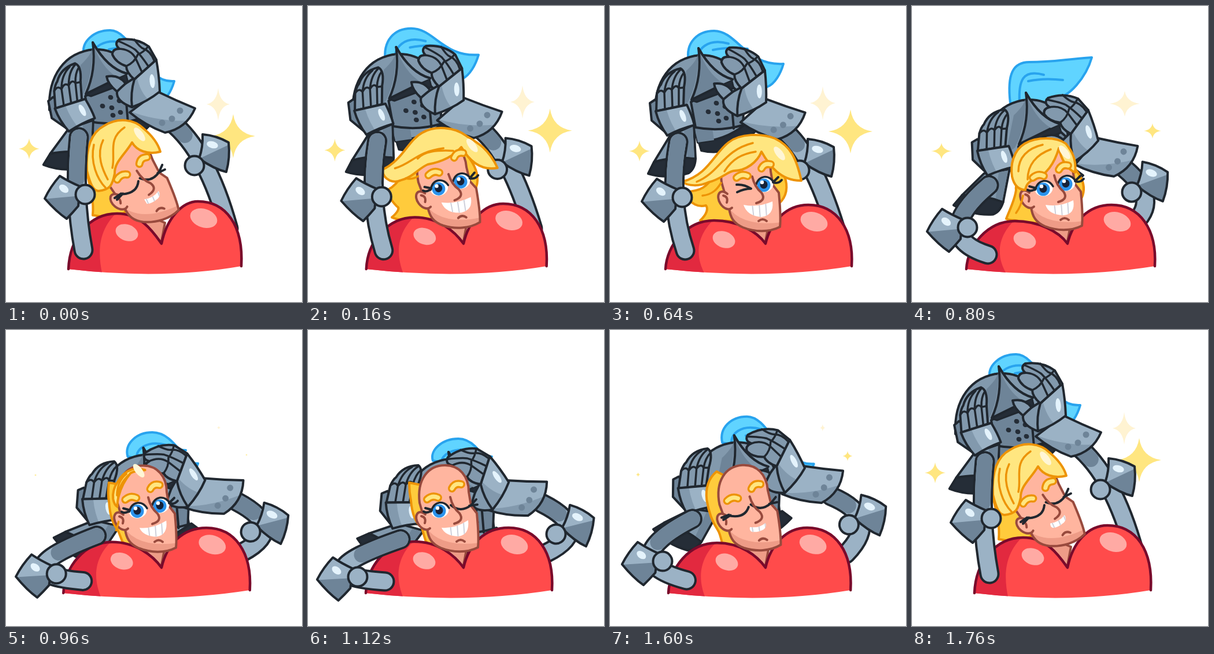
Recreate the animation shown at these times as an HTML page with a canvas. Size 512 px wide and 512 px high, loop 1.84 s.

```html
<!DOCTYPE html>
<html lang="en">
<head>
<meta charset="utf-8">
<title>Knight</title>
<style>
html, body { margin: 0; height: 100%; overflow: hidden; background: #fff; }
canvas { display: block; width: 100vw; height: 100vh; }
</style>
</head>
<body>
<canvas id="stage" width="512" height="512"></canvas>
<script>
const ctx = document.getElementById('stage').getContext('2d');
const STEP = 80, LOOP = 1840;
const INK = '#20272f', LIGHT = '#9bb2c5', STEEL = '#8299ad', MID = '#6e8498', DARK = '#252d37';
const SKIN = '#ffb59f', BLUSH = '#ee9c87', BROWN = '#984a3d';
const GOLD = '#ffe680', AMBER = '#ffcb3c', ORANGE = '#ed9306';

// Position along the list of poses at each step of the loop.
const COURSE = [0, .4, .8, 1.05, 1, 1.2, 1.5, 1.8, 2, 2.4, 3, 3.5,
  3.88, 4.05, 4, 4.15, 4.5, 4.8, 5, 5.08, 5.22, 5.55, 6];

// One entry per pose: thrown back, lifted, winking, lowering, down, resting.
const TRACKS = {
  starBig: ['393 225 38 38', '425 213 38 38', '416 217 38 38', '416 216 15 13', '416 216 0 0', '416 216 0 0'],
  starSmall: ['40 247 18 18', '48 250 18 20', '51 251 18 18', '51 251 18 14', '51 251 0 0', '51 251 0 0'],
  starPale: ['367 170 20 28', '372 165 21 29', '368 168 22 29', '368 169 26 22', '368 169 0 0', '368 169 0 0'],
  plume: ['135 85 180 42 291 130', '134 100 178 38 296 73', '136 95 180 43 300 100',
    '170 168 203 97 311 89', '216 226 260 188 335 250', '211 226 253 180 370 260'],
  helmet: ['-3 -10 0', '0 0 0', '0 0 0', '44 77 0', '90 138 0', '80 143 0'],
  heart: ['108 407 359 338', '99 414 367 343', '96 418 371 344', '94 420 372 344',
    '100 422 366 342', '99 417 371 343', '108 413 359 338'],
  head: ['260 376 -18', '253 390 -1', '250 392 0', '250 390 0', '250 386 0', '250 387 0'],
  handL: ['117 190 -6', '110 198 0', '110 198 0', '143 268 3', '162 320 11', '155 322 10'],
  cuffL: ['130 206 5', '125 216 0', '125 216 0', '147 287 14', '178 342 40', '174 344 40'],
  armL: ['M126 227Q116 325 134 422', 'M118 235Q100 333 130 423', 'M118 235Q100 333 130 423',
    'M133 310Q30 398 131 430', 'M160 362Q-22 425 133 435', 'M147 355Q-28 420 132 436'],
  elbowL: ['137 326 0', '125 331 0', '125 331 0', '96 383 0', '86 427 2', '78 421 2'],
  handR: ['242 135 0', '247 152 4', '247 152 4', '296 225 -12', '320 264 -30', '329 264 -28'],
  cuffR: ['240 165 0', '250 180 -5', '250 180 -5', '303 250 -13', '328 284 -22', '338 284 -22'],
  armR: ['M285 200Q348 250 385 385', 'M300 215Q350 255 390 385', 'M300 215Q350 255 390 385',
    'M360 275Q432 330 385 375', 'M405 300Q495 345 412 386', 'M410 312Q505 345 415 388'],
  elbowR: ['326 276 0', '328 284 0', '328 284 0', '380 322 5', '429 353 11', '438 354 10'],
  mouth: ['M243 344Q258 347 271 338Q273 346 266 350Q254 355 245 353Q241 350 243 344Z',
    'M227 340Q255 346 284 335Q287 361 262 364Q233 362 227 340Z',
    'M231 342Q256 347 281 336Q284 360 262 363Q237 361 231 342Z',
    'M231 344Q256 348 279 336Q283 360 262 362Q236 361 231 344Z',
    'M231 346Q254 348 277 333Q280 358 260 361Q237 360 231 346Z',
    'M243 346Q258 350 270 341Q272 348 266 352Q254 357 245 354Q241 351 243 346Z'],
  brows: ['0 0 0 0', '3 -6 5 -22', '10 -2 8 -4', '0 0 0 0', '-3 0 -5 -5', '-3 1 -5 -4'],
  backHair: ['M230 220C240 240 240 260 230 280L205 358C190 362 178 364 165 364C160 364 155 362 150 362C152 340 148 320 140 290C136 260 140 220 200 205Z',
    'M270 250C315 290 320 330 280 350L215 374C195 366 170 380 140 366C155 354 160 346 155 343C148 342 140 338 136 326C170 316 165 300 200 265Z',
    'M270 250C312 290 318 330 280 350L215 374C195 366 180 380 156 371C168 360 170 350 166 345C155 348 138 345 130 322C170 318 165 310 200 270Z',
    'M270 270C304 300 302 325 285 345L222 374C205 378 190 376 184 372C180 370 170 372 163 368C170 350 178 335 180 318C178 310 185 300 200 265Z',
    'M195 268C205 275 205 290 210 310L226 378C218 376 210 372 204 366C200 355 198 345 197 342C188 335 180 320 178 295C176 285 175 275 175 264Z',
    'M195 264C205 275 205 290 210 310L226 378C218 376 208 374 202 369C200 355 198 345 197 342C186 333 178 320 175 295C174 285 175 270 180 256Z'],
  hair: ['M267 252C262 235 250 222 238 212C222 196 195 192 170 207C145 220 138 250 140 285C145 305 150 320 160 320C180 318 184 310 188 290C187 270 205 258 218 236C226 250 245 258 267 252Z',
    'M343 287C325 250 305 240 283 228C262 212 225 210 205 222C180 235 170 272 125 283C128 303 150 303 160 297C180 292 195 272 212 270C240 270 262 262 277 246C290 268 310 293 343 287Z',
    'M331 302C322 262 312 242 285 229C262 220 225 220 205 236C180 255 170 292 125 304C135 312 155 312 170 305C192 300 205 285 215 285C235 285 255 270 262 252C275 275 295 303 331 302Z',
    'M282 288C285 265 276 250 266 238C250 226 215 226 195 238C175 250 170 275 173 295C177 312 186 318 196 318C198 306 205 302 213 300C235 290 247 270 254 246C258 265 268 282 282 288Z',
    'M235 236C225 236 215 238 210 242C200 248 196 256 193 266C188 275 186 285 187 292C188 298 190 302 192 304C192 296 192 290 193 284C194 270 200 258 210 248C218 240 226 238 235 236Z'],
  strands: ['M152 240C145 270 158 300 172 314M168 232C155 258 168 285 176 300M205 210C175 230 190 255 184 280',
    'M150 291C190 272 195 240 250 229M195 272C212 250 235 240 270 238M160 320C178 318 186 308 192 298',
    'M150 304C190 288 195 250 247 237M198 286C212 264 228 256 252 252M160 328C178 326 186 316 192 306',
    'M184 286C184 262 200 246 226 240M200 300C200 275 215 257 240 248M180 358C186 350 190 340 192 328',
    'M193 286C193 272 196 260 206 250M193 290C193 276 198 262 210 250M192 345C193 340 194 336 195 332'],
  shine: ['231 222', '297 246', '293 255', '264 253', '225 242']
};
TRACKS.hair[5] = TRACKS.hair[4];
TRACKS.strands[5] = TRACKS.strands[4];
TRACKS.shine[5] = TRACKS.shine[4];

const NUMBER = /-?\d+(\.\d+)?/g;
let place = 0;

function at(name) {
  const track = TRACKS[name], i = Math.min(5, Math.floor(place)), k = place - i;
  const goal = (track[i + 1] || track[0]).match(NUMBER);
  let n = 0;
  return track[i].replace(NUMBER, v => (+v + (goal[n++] - v) * k).toFixed(2));
}
const nums = name => at(name).split(' ').map(Number);

function shape(d, fill, stroke, width = 4) {
  const path = new Path2D(d);
  if (fill) { ctx.fillStyle = fill; ctx.fill(path); }
  if (stroke) { ctx.strokeStyle = stroke; ctx.lineWidth = width; ctx.stroke(path); }
}
const line = (d, color = INK, width = 4) => shape(d, null, color, width);

function oval(x, y, rx, ry, fill, turn = 0, stroke) {
  ctx.beginPath();
  ctx.ellipse(x, y, rx, ry, turn * Math.PI / 180, 0, 7);
  ctx.fillStyle = fill;
  ctx.fill();
  if (stroke) { ctx.strokeStyle = stroke; ctx.lineWidth = 4; ctx.stroke(); }
}

function group(name, ox, oy, paint) {
  const [x, y, turn] = nums(name);
  ctx.save();
  ctx.translate(x, y);
  ctx.rotate(turn * Math.PI / 180);
  ctx.translate(-ox, -oy);
  paint();
  ctx.restore();
}

function clipped(d, paint) {
  ctx.save();
  ctx.clip(new Path2D(d));
  paint();
  ctx.restore();
}

function star(name, color) {
  const [x, y, rx, ry] = nums(name), a = rx * .13, b = ry * .13;
  shape(`M${x} ${y - ry}Q${x + a} ${y - b} ${x + rx} ${y}Q${x + a} ${y + b} ${x} ${y + ry}` +
    `Q${x - a} ${y + b} ${x - rx} ${y}Q${x - a} ${y - b} ${x} ${y - ry}Z`, color);
}

function plume() {
  const [bx, by, px, py, tx, ty] = nums('plume'), blue = '#28a3ee';
  shape(`M${bx} ${by}C${bx - 6} ${py + 20} ${px - 28} ${py} ${px} ${py}` +
    `C${px + 40} ${py} ${px + 55} ${ty + 4} ${tx} ${ty}` +
    `C${tx - 10} ${ty + 35} ${tx - 40} ${ty + 70} ${px + 45} ${py + 62}L${bx + 60} ${by + 10}Z`, '#60d4ff', blue);
  line(`M${bx + 16} ${by}C${bx + 14} ${py + 32} ${px - 12} ${py + 12} ${px + 25} ${py + 22}` +
    `M${px - 2} ${py + 33}Q${px + 25} ${py + 27} ${px + 58} ${py + 31}`, blue);
}

function helmet() {
  shape('M152 230Q200 222 236 204L252 216Q210 262 158 250Z', DARK, INK);
  shape('M78 190C75 130 105 90 155 85C198 84 222 110 226 150L228 205L150 216Z', STEEL, INK);
  shape('M143 198L152 236Q200 232 232 206L228 180Z', STEEL, INK);
  shape('M143 198L152 236L180 232L176 205Z', MID);
  shape('M132 112Q150 95 152 84Q154 130 134 168L118 180Z', MID);
  shape('M140 166L206 134L232 158L230 206Q190 218 148 210Z', MID, INK);
  line('M208 140L214 212');
  shape('M141 163L210 126L214 142L150 166Z', DARK, INK, 3);
  shape('M153 73C166 96 186 120 212 127L141 162C152 138 158 110 153 73Z', MID, INK);
  shape('M153 73C166 96 186 120 212 127L196 134Q166 115 153 73Z', STEEL);
  line('M153 73C166 96 186 120 212 127');
  for (const [x, y] of [[184, 168], [199, 174], [170, 183], [186, 186], [201, 194], [188, 199]])
    oval(x, y, 4.5, 4, DARK, 25);
}

function tube(name, dash) {
  const d = at(name);
  line(d, INK, 35);
  line(d, LIGHT, 27);
  ctx.setLineDash([dash, 999]);
  line(d, MID, 27);
  ctx.setLineDash([]);
}

const joint = () => oval(0, 0, 16.5, 16.5, LIGHT, 0, INK);

function elbowLeft() {
  const d = 'M-70 7Q-60 -14 -44 -32Q-28 -22 -9 -14L-12 20Q-22 32 -32 42Q-50 30 -70 7Z';
  shape(d, LIGHT);
  clipped(d, () => shape('M-72 8L-6 2L-6 50L-60 50Z', MID));
  line(d);
  oval(-37, -10, 9, 6, '#e4f3fc', 35);
  joint();
}

function elbowRight() {
  const d = 'M14 -54Q38 -52 59 -40Q62 -14 55 11Q34 6 8 -12Q15 -32 14 -54Z';
  shape(d, LIGHT);
  clipped(d, () => shape('M4 -10L64 -38L62 20L20 10Z', MID));
  line(d);
  oval(31, -36, 10, 6, '#e4f3fc', 15);
  joint();
}

function cuffLeft() {
  shape('M76 270Q105 256 148 264Q147 282 136 289Q100 300 66 290Z', DARK, INK);
  shape('M104 224L145 206L148 264Q108 260 76 270Z', STEEL, INK);
  shape('M128 216L143 209L146 262L134 261Z', MID);
}

function handLeft() {
  shape('M78 162L69 168L72 198L100 222L110 190Z', MID, INK);
  shape('M80 182L81 152Q84 140 88 136Q96 114 122 108Q133 114 128 140L127 172Z', STEEL, INK);
  line('M95 179L94 150Q96 126 112 113M108 176L107 145Q109 122 122 110M119 174L119 142Q120 125 128 115' +
    'M81 152Q88 142 94 150Q100 138 107 145Q114 134 119 142L128 141', INK, 3.5);
  const d = 'M79 182L133 171Q142 190 146 206Q122 212 99 224Q85 205 79 182Z';
  shape(d, LIGHT);
  clipped(d, () => shape('M75 180L98 180Q105 205 120 225L80 230Z', STEEL));
  line(d);
  oval(126, 190, 4.5, 11, '#e4f3fc', -22);
}

function cuffRight() {
  const d = 'M262 148Q295 164 327 177Q312 212 275 219Q240 206 214 184Z';
  shape(d, LIGHT);
  clipped(d, () => shape('M210 180Q262 202 330 198L300 230L210 220Z', STEEL));
  line(d);
  for (const [x, y] of [[270, 202], [287, 195], [301, 181]]) oval(x, y, 5.5, 5.5, MID);
}

function handRight() {
  shape('M218 175Q190 165 192 148Q176 135 174 122Q195 118 207 134L226 122Z', STEEL, INK);
  line('M192 148Q200 140 207 134');
  shape('M222 127L260 93L247 70Q225 54 196 58Q186 65 196 74Q184 74 184 84Q190 98 208 104Q208 115 222 127Z', STEEL, INK);
  line('M194 74Q215 74 224 90L235 114M193 60Q216 70 224 76Q234 86 246 104M222 58Q232 72 238 74Q250 78 256 94' +
    'M208 104Q222 98 228 84Q238 80 246 70', INK, 3.5);
  const d = 'M222 127L260 93Q265 120 266 148Q245 165 218 175Q215 150 222 127Z';
  shape(d, LIGHT);
  clipped(d, () => shape('M215 125L226 122Q232 150 250 166L215 180Z', STEEL));
  line(d);
  oval(253, 130, 4.5, 12, '#e4f3fc', -5);
}

function heart() {
  const [l, r, lp, rp] = nums('heart');
  const edge = `M${l} 455C${l + 2} ${lp + 43} ${l + 36} ${lp} ${l + 84} ${lp}` +
    `C${l + 125} ${lp} 254 390 269 411C278 ${rp + 29} 305 ${rp} ${r - 75} ${rp}C${r - 26} ${rp} ${r + 4} ${rp + 42} ${r} 450`;
  const body = edge + `Q270 474 ${l} 455Z`;
  shape(body, '#ff4b4b');
  clipped(body, () => shape(`M${l - 9} 480V${lp - 9}H${l + 92}C${l + 53} ${lp + 22} ${l + 48} ${lp + 62} 168 470Z`, '#e2293f'));
  line(edge, '#790a2b', 4.5);
  oval(l + 101, lp + 33, 20, 14, '#ffaaa4', 20);
  oval(r - 65, rp + 29, 24, 16, '#ffaaa4', 18);
}

function face() {
  const d = 'M193 303C188 262 208 238 237 238C262 238 278 257 278 284L282 308L292 321' +
    'C294 343 296 362 294 380C275 390 250 389 230 381C214 374 208 364 206 348Z';
  shape(d, SKIN);
  clipped(d, () => shape('M198 335Q220 382 296 372V395H195Z', BLUSH));
  line(d, BROWN);
  shape('M203 323C190 312 182 326 191 340C197 349 206 352 211 347L212 325Z', SKIN);
  line('M203 323C190 312 182 326 191 340C197 349 206 352 211 347M196 326Q205 328 202 338', BROWN);
}

function openEye(x, y) {
  oval(x, y, 15.5, 13, '#fff', -12);
  oval(x - 1, y + 1, 11.5, 11.5, '#2b93ec');
  oval(x - 1, y, 6.5, 7, '#172238');
  oval(x - 4, y - 4, 3.2, 3.2, '#fff');
  line(`M${x - 15} ${y + 2}C${x - 10} ${y - 17} ${x + 8} ${y - 18} ${x + 16} ${y - 4}`, INK, 3.5);
}

function features(t) {
  const resting = t < 160 || t >= 1360;
  if (resting) line('M210 324Q235 330 243 311M198 330L211 323M195 326L208 322');
  else if (t >= 560 && t < 720) line('M219 307Q232 306 244 314Q232 314 220 320');
  else {
    openEye(228, 316);
    line('M200 318Q206 322 214 316M203 312L214 315');
  }
  if (resting || t >= 1040) line('M247 307Q264 321 282 307L291 297M279 308L293 306');
  else {
    openEye(267, 307);
    line('M282 303Q291 306 297 299M283 302L291 294');
  }
  line('M246 293Q250 311 262 321Q271 334 253 339', BROWN);

  const mouth = at('mouth');
  shape(mouth, '#fff');
  clipped(mouth, () => line('M246 340L249 366M258 340L260 366M269 336L271 364', '#cfd0da', 2));
  line('M257 370Q264 364 271 370', BROWN);

  const [lx, ly, rx, ry] = nums('brows');
  const brows = `M${209 + lx} ${297 + ly}Q${218 + lx} ${289 + ly} ${228 + lx} ${294 + ly}` +
    `M${254 + rx} ${283 + ry}Q${259 + rx} ${273 + ry} ${270 + rx} ${276 + ry}`;
  line(brows, ORANGE, 14);
  line(brows, GOLD, 7);
}

function hair() {
  shape(at('hair'), GOLD, ORANGE);
  line(at('strands'), ORANGE, 3.5);
  const [x, y] = nums('shine');
  oval(x, y, 14, 6, '#fff6d6', 52);
}

function draw(t) {
  place = COURSE[t / STEP];
  ctx.fillStyle = '#fff';
  ctx.fillRect(0, 0, 512, 512);
  star('starBig', GOLD);
  star('starSmall', GOLD);
  star('starPale', '#fff3d2');
  plume();
  group('helmet', 0, 0, helmet);
  tube('armR', 34);
  group('cuffR', 240, 165, cuffRight);
  group('handR', 242, 135, handRight);
  group('elbowR', 0, 0, elbowRight);
  group('cuffL', 125, 216, cuffLeft);
  group('handL', 110, 198, handLeft);
  shape(at('backHair'), AMBER, ORANGE);
  shape('M215 350L275 375L268 412L235 395Z', BLUSH, BROWN);
  heart();
  group('head', 250, 390, face);
  if (t < 1120 || t >= 1680) hair();
  group('head', 250, 390, () => features(t));
  tube('armL', 72);
  group('elbowL', 0, 0, elbowLeft);
}

ctx.lineCap = ctx.lineJoin = 'round';
const start = performance.now();
function tick() {
  const t = (performance.now() - start) % LOOP;
  draw(Math.floor(t / STEP) * STEP);
  requestAnimationFrame(tick);
}
tick();
</script>
</body>
</html>
```
